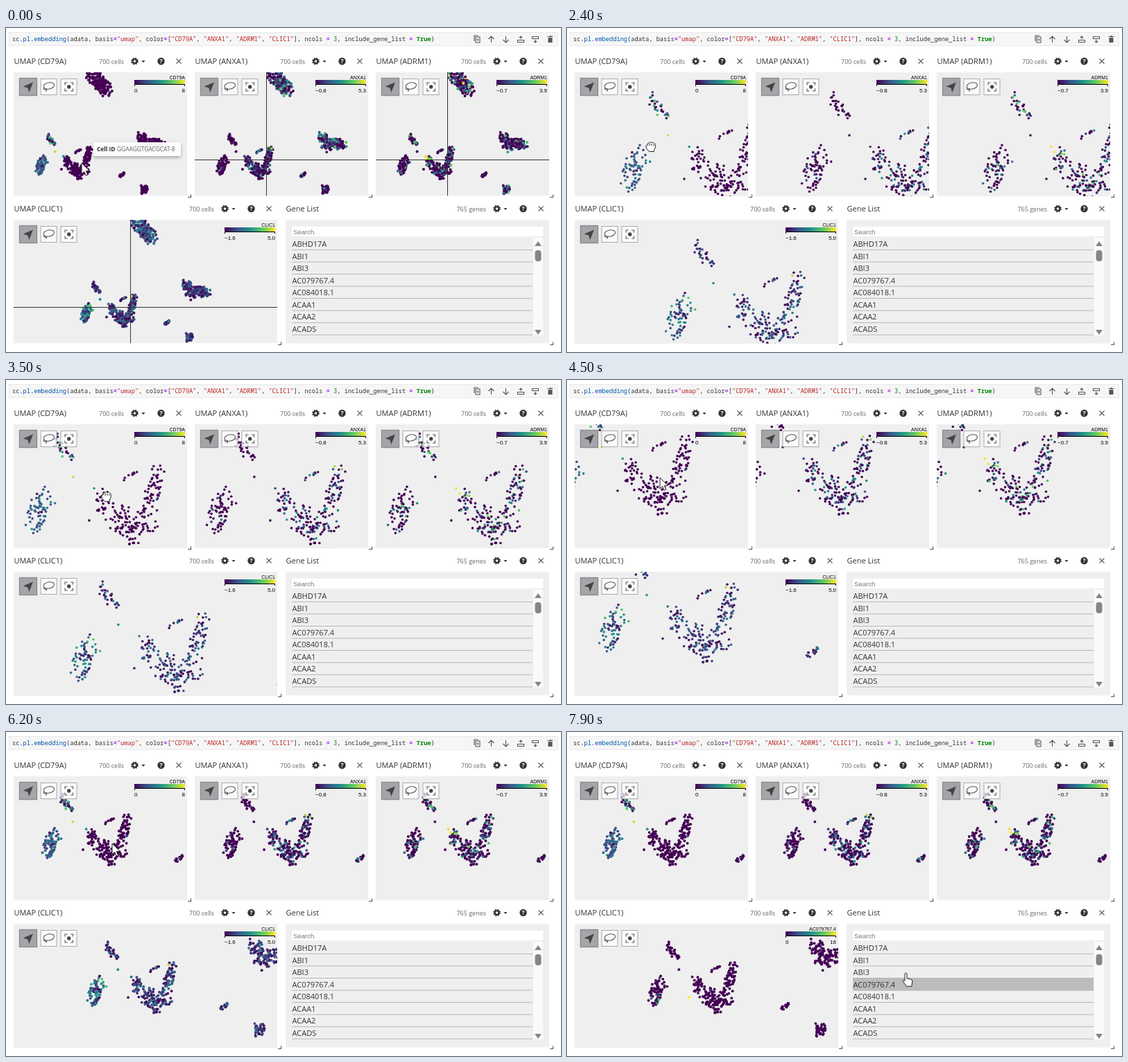
Recreate the animation shown at these times as an HTML page with a canvas. Size 800x468 px, loop 8 s.

```html
<!DOCTYPE html>
<html lang="en">
<head>
<meta charset="utf-8">
<title>UMAP panels</title>
<style>
html, body { margin: 0; width: 100%; height: 100%; overflow: hidden; background: #fff; }
canvas, svg { position: absolute; left: 0; top: 0; width: 800px; height: 468px; }
text { font: 11px "Open Sans", "Noto Sans", sans-serif; fill: #333; white-space: pre; }
.code { font: 8.69px "Noto Sans Mono", "DejaVu Sans Mono", monospace; }
.s { fill: #ba2121 } .p { fill: #05a } .n { fill: #080 } .o { fill: #a2f; font-weight: bold } .k { fill: #080; font-weight: bold }
.count { font-size: 9px; fill: #666; text-anchor: end; }
.end { text-anchor: end }
.gene { font: 7px "Liberation Sans", sans-serif; fill: #000; text-anchor: end; }
.tick { font: 8px "Liberation Sans", sans-serif; fill: #000; }
.search { font: 9.6px "Liberation Sans", sans-serif; fill: #777; }
.help { font: bold 8.5px "Open Sans", sans-serif; fill: #fff; text-anchor: middle; }
.tip { font-size: 8.4px; fill: #666; }
.line { fill: none; stroke: #555; stroke-width: 1.1; }
</style>
</head>
<body>
<canvas id="plot" width="800" height="468"></canvas>
<svg id="ui" viewBox="0 0 800 468"></svg>
<script>
const LOOP = 8000, PICK = 7500, H = 178.5;
const panels = [
  { x: 11, y: 64, w: 250, gene: "CD79A", lo: "0", hi: "8" },
  { x: 272, y: 64, w: 250, gene: "ANXA1", lo: "−0.8", hi: "5.3" },
  { x: 533, y: 64, w: 250, gene: "ADRM1", lo: "−0.7", hi: "3.9" },
  { x: 11, y: 277, w: 380, gene: "CLIC1", lo: "−1.6", hi: "5.0" }
];
const list = { x: 403, y: 277, w: 380 };
const genes = ["ABHD17A", "ABI1", "ABI3", "AC079767.4", "AC084018.1", "ACAA1", "ACAA2", "ACADS"];
const lerp = (a, b, f) => a + (b - a) * f;
const ramp = (t, from, to) => Math.min(1, Math.max(0, (t - from) / (to - from)));

// ---- cells: random points around short strokes ----
let seed = 11;
function rnd() {
  seed = seed + 0x6D2B79F5 | 0;
  let t = Math.imul(seed ^ seed >>> 15, 1 | seed);
  t = t + Math.imul(t ^ t >>> 7, 61 | t) ^ t;
  return ((t ^ t >>> 14) >>> 0) / 4294967296;
}
const cells = [];
function stroke(group, count, x1, y1, x2, y2, radius) {
  while (count--) {
    const f = rnd(), r = radius * Math.sqrt(rnd()), a = rnd() * 2 * Math.PI;
    cells.push({ group, x: lerp(x1, x2, f) + r * Math.cos(a), y: lerp(y1, y2, f) + r * Math.sin(a) });
  }
}
stroke("main", 58, 221, 125, 205, 190, 12);
stroke("main", 30, 137, 157, 140, 190, 11);
stroke("main", 72, 152, 197, 198, 204, 21);
stroke("main", 26, 162, 221, 218, 211, 8);
stroke("main", 12, 176, 231, 188, 234, 8);
stroke("main", 8, 172, 144, 190, 134, 4);
stroke("lower", 62, 52, 170, 40, 210, 14);
stroke("lower", 6, 60, 153, 68, 185, 5);
stroke("upper", 28, 69, 83, 94, 116, 8);
stroke("small", 16, 327, 228, 346, 218, 4);
stroke("right", 60, 402, 75, 420, 130, 16);
stroke("right", 80, 430, 115, 475, 112, 20);
stroke("top", 140, 230, -135, 280, -80, 27);
stroke("bottom", 40, 414, 268, 418, 285, 13);
const anchor = { group: "main", x: 120, y: 203 };
cells.push(anchor, { group: "upper", x: 97, y: 140 });

// ---- expression level 0..1 for each gene ----
const is = (p, ...groups) => groups.includes(p.group);
const lobe = p => Math.hypot(p.x - 137, p.y - 155) < 16;
const armTip = p => is(p, "main") && p.x > 210 && p.y < 130;
const some = (share, lo, hi) => rnd() < share ? lerp(lo, hi, rnd() ** 1.6) : 0;
const level = [
  p => is(p, "lower") ? some(.95, .2, .55) : is(p, "upper") ? some(.55, .2, 1) : some(.01, .3, .6),
  p => is(p, "lower", "upper") ? some(.08, .1, .4) : lobe(p) || armTip(p) ? some(.5, .2, 1)
    : is(p, "right", "top") ? some(.55, .12, .75) : some(.35, .1, .55),
  p => lobe(p) ? some(.5, .3, 1) : is(p, "top") ? some(.45, .2, 1) : some(.3, .15, .8),
  p => armTip(p) ? some(.8, .2, 1) : is(p, "lower") && p.y < 180 ? some(.9, .2, .75)
    : is(p, "lower", "upper", "top") ? some(.9, .1, .55) : some(.85, .05, .42),
  p => p === anchor ? 1 : is(p, "lower") && p.y > 195 ? some(.5, .2, .7) : some(.01, .1, .4)
];
const viridis = [[68, 1, 84], [59, 82, 139], [33, 145, 140], [94, 201, 98], [253, 231, 37]];
function shade(v) {
  const i = Math.min(3, v * 4 | 0);
  return `rgb(${viridis[i].map((a, j) => Math.round(lerp(a, viridis[i + 1][j], v * 4 - i)))})`;
}
const tints = level.map(fn => cells.map(p => shade(fn(p))));

// ---- static interface ----
const header = (p, title, count) => {
  const r = p.x + p.w, y = p.y - 16;
  return `<text x="${p.x + .5}" y="${p.y - 12}">${title}</text>
  <text class="count" x="${r - 91}" y="${p.y - 12.5}">${count}</text>
  <g transform="translate(${r - 75.5} ${y})" fill="none" stroke="#333">
    <circle r="2.9" stroke-width="2.3"/><circle r="4.4" stroke-width="1.8" stroke-dasharray="2 1.455"/></g>
  <path d="M${r - 65.5} ${y - 1}h5l-2.5 3z" fill="#333"/>
  <circle cx="${r - 37.5}" cy="${y}" r="5.2" fill="#333"/><text class="help" x="${r - 37.5}" y="${y + 3}">?</text>
  <path class="line" d="M${r - 15.5} ${y - 3.5}l7 7m0-7l-7 7"/>
  <path class="line" d="M${r + 5.5} ${p.y + H - 2}v4h-4.5"/>`;
};
const tools = p => `<g transform="translate(${p.x} ${p.y})">
  <rect x="8.5" y="8.5" width="25" height="25" fill="#a0a0a4" stroke="#8c8c92" stroke-width="1.4" fill-opacity=".93"/>
  <path d="M28 14.5L13.5 20.5l6.8 1.9 2 6.6z" fill="#444"/>
  <g fill="#fff" fill-opacity=".7" stroke="#aaa"><rect x="39" y="9.5" width="23" height="23"/><rect x="68" y="9.5" width="23" height="23"/></g>
  <g class="line"><ellipse cx="50.8" cy="19.5" rx="7.8" ry="4.6" transform="rotate(-10 50.8 19.5)"/><path d="M44 22.5q-1.5 2.5 1 2.5t1.5-1.5q2 2 0 4"/>
  <path d="M74 18.5v-3.5h3.5m4.5 0h3.5v3.5m0 5v3.5h-3.5m-4.5 0h-3.5v-3.5"/></g>
  <circle cx="79.7" cy="21" r="2.7" fill="#444"/></g>`;
const scaleText = (p, gene, lo, hi, id) => {
  const r = p.x + p.w - 3;
  return `<g id="${id}"><text class="gene" x="${r}" y="${p.y + 9.5}">${gene}</text>
  <text class="tick" x="${r - 73}" y="${p.y + 28.5}">${lo}</text><text class="tick end" x="${r}" y="${p.y + 28.5}">${hi}</text></g>`;
};
const legend = (p, i) => {
  const l = p.x + p.w - 76;
  return `<rect x="${l}" y="${p.y + 11}" width="73" height="6" fill="url(#ramp)"/>
  <path d="M${l + .5} ${p.y + 20}v-2.5h72v2.5" fill="none" stroke="#000"/>` + scaleText(p, p.gene, p.lo, p.hi, "key" + i);
};
const span = (cls, s) => `<tspan class="${cls}">${s}</tspan>`;
const str = s => span("s", `"${s}"`), dot = span("o", "."), eq = span("o", "=");
const code = `sc${dot}${span("p", "pl")}${dot}${span("p", "embedding")}(adata, basis${eq}${str("umap")}, color${eq}[`
  + panels.map(p => str(p.gene)).join(", ")
  + `], ncols ${eq} ${span("n", 3)}, include_gene_list ${eq} ${span("k", "True")})`;
const rows = genes.map((g, i) => {
  const y = 316 + i * 17.55;
  return `<text x="412.5" y="${y}">${g}</text><path d="M412 ${y + 4.4}h347" stroke="#b8b8b8"/>`;
}).join("");

document.getElementById("ui").innerHTML = `
<defs><linearGradient id="ramp">${viridis.map((c, i) => `<stop offset="${i / 4}" stop-color="rgb(${c})"/>`).join("")}</linearGradient>
<filter id="soft" x="-10%" y="-40%" width="120%" height="190%"><feDropShadow dx="0" dy="2" stdDeviation="2.5" flood-opacity=".35"/></filter></defs>
<rect x="4.5" y="6.5" width="791" height="19" fill="#f6f6f6" stroke="#e8e8e8"/>
<text class="code" x="9" y="19">${code}</text>
<g class="line">
  <path d="M677 13h6v8h-6zM675 19v-8h6M678.5 17h3m-1.5-1.5v3"/>
  <path d="M699.5 21v-9m-4 4l4-4 4 4M720.5 12v9m-4-4l4 4 4-4"/>
  <path d="M737.5 17.5h9v3h-9zM742 16v-4m-2 2l2-2 2 2M758.5 12.5h9v3h-9zM763 17v4m-2-2l2 2 2-2"/></g>
<path d="M781.5 14h6v7h-6zM780.5 12h2.500l1-1h1.500l1 1h2v1h-8z" fill="#555"/>
${panels.map((p, i) => header(p, `UMAP (${p.gene})`, "700 cells") + tools(p) + legend(p, i)).join("")}
${scaleText(panels[3], "AC079767.4", "0", "16", "keyNew")}
${header(list, "Gene List", "765 genes")}
<rect x="403" y="277" width="380" height="${H}" fill="#efefef"/>
<rect x="412" y="287" width="362" height="14" fill="#fff"/><text class="search" x="414" y="297.5">Search</text>
<rect id="chosen" x="412" y="356" width="347" height="17.5" fill="#bcbcbc"/>
${rows}
<rect x="760" y="303" width="14" height="141" fill="#fafafa"/>
<g fill="#858585"><path d="M762 315l5-7 5 7zM762 436h10l-5 7z"/><rect x="762.5" y="321" width="9" height="16" rx="4"/></g>
<g id="tip"><rect x="126" y="165" width="126" height="20" rx="2" fill="#fff" fill-opacity=".94" filter="url(#soft)"/>
<text class="tip" x="131" y="178"><tspan font-weight="bold" fill="#333">Cell ID</tspan></text><text class="tip" x="160" y="178">GGAAGGTGACGCAT-8</text></g>
<g id="mouse" fill="#fff" stroke="#222" stroke-linejoin="round">
  <path d="M0 0v16l3.7-3.4 2.5 5.7 2.6-1.1-2.5-5.6h5z"/>
  <path d="M-6 -1q0-2.5 2.3-2v-2q1-2 3-1q1-2 3-.5q2-1 3 1q2 0 2 2v4l-2 4v2h-7l-4-5zM-1 -5v3M2 -5v3M5 -4v2"/>
  <path d="M0 1q1.5-2 3 0v7l6 1.3q2 .7 1.8 3l-1 7h-7.5l-5.3-7.5q-.5-2 2-1.3l1 1.2z"/>
</g>`;

// ---- motion ----
// pointer stops; a stop with drag pulls the plots along until the next one
const stops = [
  { t: 0, x: 109, y: 195 }, { t: 1300, x: 109, y: 195, drag: 1 }, { t: 1700, x: 197, y: 195 },
  { t: 1950, x: 76, y: 172, drag: 1 }, { t: 2300, x: 120, y: 172, drag: 1 }, { t: 2450, x: 120, y: 172 },
  { t: 3000, x: 193, y: 184, drag: 1 }, { t: 3500, x: 144, y: 169, drag: 1 }, { t: 3800, x: 114, y: 138, drag: 1 },
  { t: 4200, x: 97, y: 126 }, { t: 4450, x: 134, y: 141 }, { t: 5000, x: 134, y: 141 }, { t: 5900, x: 153, y: 161 },
  { t: 6500, x: 153, y: 161 }, { t: 7300, x: 488, y: 360 }, { t: 7850, x: 487, y: 348 }
];
function pointer(t) {
  const m = { x: stops[0].x, y: stops[0].y, panX: 0, panY: 0, drag: 0 };
  stops.forEach((a, i) => {
    const b = stops[i + 1] || a;
    if (t < a.t) return;
    const f = ramp(t, a.t, b.t) || 0, dx = (b.x - a.x) * f, dy = (b.y - a.y) * f;
    m.x = a.x + dx;
    m.y = a.y + dy;
    m.drag = a.drag;
    if (a.drag) { m.panX += dx; m.panY += dy; }
  });
  return m;
}
function camera(t, m) {
  const start = t < 1300;
  const zoom = start ? lerp(.404, 1, ramp(t, 100, 900)) : lerp(1, .641, ramp(t, 4800, 5900));
  const [fx, fy] = start ? [109, 194.5] : [179, 188];
  return { zoom, x: lerp(fx, 37 + m.panX, zoom), y: lerp(fy, 218 + m.panY, zoom) };
}

const ctx = document.getElementById("plot").getContext("2d");
const $ = id => document.getElementById(id);
const show = (el, on) => el.style.display = on ? "" : "none";

function drawPanel(p, i, t, cam) {
  ctx.save();
  ctx.beginPath();
  ctx.rect(p.x, p.y, p.w, H);
  ctx.clip();
  ctx.fillStyle = "#efefef";
  ctx.fillRect(p.x, p.y, p.w, H);
  const dx = p.x - 11 + (p.w - 250) / 2, dy = i === 3 ? 213.5 : 0;
  const tint = tints[i === 3 && t >= PICK ? 4 : i];
  cells.forEach((c, n) => {
    ctx.fillStyle = tint[n];
    ctx.beginPath();
    ctx.arc(cam.x + dx + cam.zoom * (c.x - anchor.x), cam.y + dy + cam.zoom * (c.y - anchor.y), 2.2 - .4 * cam.zoom, 0, 7);
    ctx.fill();
  });
  if (i && t < 100) {
    ctx.fillStyle = "#333";
    ctx.fillRect(114 + dx, p.y, 1, H);
    ctx.fillRect(p.x, Math.floor(190 + dy), p.w, 1);
  }
  ctx.restore();
}

function frame(now) {
  const t = now % LOOP, m = pointer(t), cam = camera(t, m);
  panels.forEach((p, i) => drawPanel(p, i, t, cam));
  const shape = m.x > 412 && m.y > 303 ? 2 : m.drag ? 1 : 0;
  $("mouse").setAttribute("transform", `translate(${m.x} ${m.y})`);
  [...$("mouse").children].forEach((el, i) => show(el, i === shape));
  show($("tip"), t < 100);
  show($("chosen"), t >= PICK);
  show($("key3"), t < PICK);
  show($("keyNew"), t >= PICK);
  requestAnimationFrame(frame);
}
requestAnimationFrame(frame);
</script>
</body>
</html>
```
